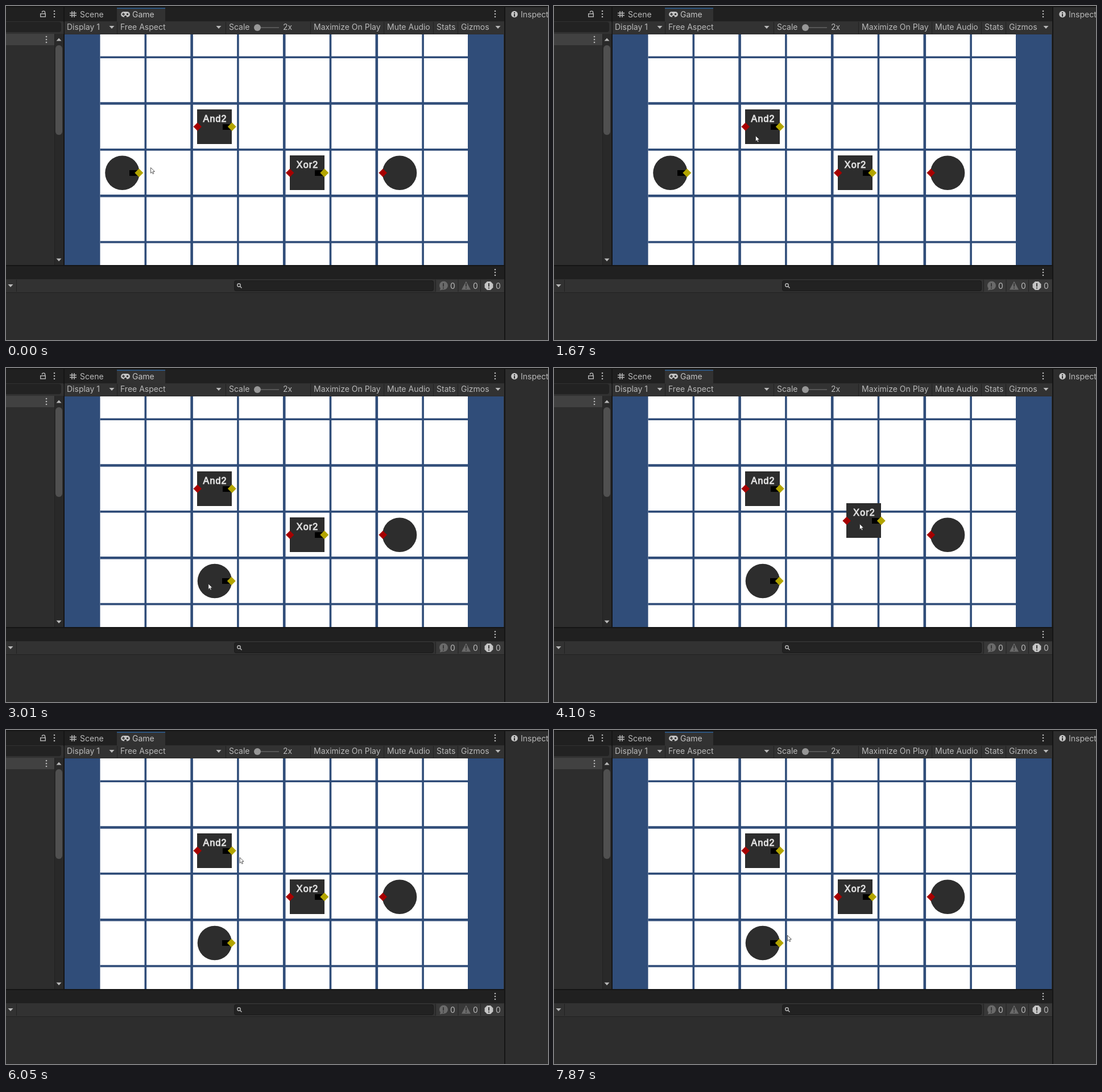
An HTML page with a canvas that plays this animation: 953 px wide and 588 px high, repeating every 7.99 s.

```html
<!DOCTYPE html>
<html lang="en">
<head>
<meta charset="utf-8">
<title>Logic gate editor</title>
<style>
html, body { margin: 0; width: 100%; height: 100%; overflow: hidden; background: #2d2d2d; }
canvas { display: block; }
</style>
</head>
<body>
<canvas id="stage" width="953" height="588"></canvas>
<script>
const ctx = document.getElementById('stage').getContext('2d');
const LOOP = 7990, STEP = 120;
const DARK = '#151515', BAR = '#202020', TOOL = '#323232', PANEL = '#2d2d2d';
const INK = '#b9b9b9', BRIGHT = '#c4c4c4', FIELD = '#222', BLUE = '#304d79';

// The picture updates in even steps, counted anew after each pause.
const RESTARTS = [0, 590, 3260, 5810, 6910];

// Turning points of the pointer: time, x, y
const PATH = [
  [0, 254, 284], [310, 230, 294], [590, 226, 294], [1310, 331, 267], [1670, 354, 228],
  [2150, 195, 299], [2390, 264, 351], [2870, 356, 380], [3260, 354, 378], [3860, 521, 298],
  [4100, 537, 274], [4460, 522, 217.5], [4820, 525, 250], [4940, 527, 292], [5540, 403, 240],
  [5930, 388, 206], [6290, 456, 260], [6530, 445, 344], [6770, 412, 374], [7150, 388, 330],
  [7630, 441, 274], [7870, 410, 361]
];
const SOURCE_DRAG = { from: 2270, to: 2870, glowEnd: 2990 };
const XOR_DRAG = { from: 3980, to: 4940 };

function quantize(t) {
  const start = RESTARTS.findLast(s => s <= t);
  return start + Math.floor((t - start) / STEP) * STEP;
}

function pointerAt(t) {
  const i = Math.max(1, PATH.findIndex(key => key[0] >= t));
  const [t0, x0, y0] = PATH[i - 1], [t1, x1, y1] = PATH[i];
  const u = (t - t0) / (t1 - t0);
  return [x0 + (x1 - x0) * u, y0 + (y1 - y0) * u];
}

const during = (t, { from, to }) => t >= from && t < to;
const cell = (col, row) => ({ x: 204.5 + 81.25 * col, y: 50 + 81.25 * row });

function rect(x, y, w, h, color, radius = 0) {
  ctx.fillStyle = color;
  ctx.beginPath();
  ctx.roundRect(x, y, w, h, radius);
  ctx.fill();
}

function circle(x, y, r, color) {
  rect(x - r, y - r, 2 * r, 2 * r, color, r);
}

function poly(points, color) {
  ctx.fillStyle = color;
  ctx.beginPath();
  points.forEach(([x, y]) => ctx.lineTo(x, y));
  ctx.closePath();
  ctx.fill();
}

function regular(sides, x, y, r, color, turn = 0) {
  poly(Array.from({ length: sides }, (_, i) => {
    const a = (i + turn) * 2 * Math.PI / sides;
    return [x + r * Math.cos(a), y + r * Math.sin(a)];
  }), color);
}

function line(x1, y1, x2, y2, color = INK, width = 1.5) {
  ctx.strokeStyle = color;
  ctx.lineWidth = width;
  ctx.beginPath();
  ctx.moveTo(x1, y1);
  ctx.lineTo(x2, y2);
  ctx.stroke();
}

function text(str, x, y, color = INK) {
  ctx.font = '14px Inter, sans-serif';
  ctx.textAlign = 'left';
  ctx.fillStyle = color;
  ctx.fillText(str, x, y);
}

const divider = (x, y) => rect(x, y, 1, 21, FIELD);
const diamond = (x, y, r, color) => regular(4, x, y, r, color);
const arrow = (x, y, dir = 1) =>
  poly([[x - 4.5, y - 2.5 * dir], [x + 4.5, y - 2.5 * dir], [x, y + 2.5 * dir]], INK);
const menu = (x, y) => [-5, 0, 5].forEach(d => circle(x, y + d, 1.3, INK));

function exclaim(x, y, color) {
  rect(x - 1, y - 4, 2, 6, color);
  rect(x - 1, y + 3.5, 2, 2, color);
}

function drawHierarchy() {
  rect(0, 2, 101, 25, BAR);
  rect(0, 27, 101, 22, TOOL);
  rect(-10, 28, 107, 18, FIELD, 4);
  rect(0, 49, 86, 20, '#414141');
  rect(86, 49, 15, 407, '#292929');
  rect(85, 49, 1, 407, FIELD);
  rect(87, 69, 12, 158, '#505050', 6);
  arrow(93, 59, -1);
  arrow(93, 447);
  menu(85, 14);
  menu(71, 59);
  ctx.strokeStyle = INK;
  ctx.lineWidth = 1.4;
  ctx.strokeRect(60.7, 13.7, 8.6, 5.2);
  ctx.beginPath();
  ctx.arc(66, 11.5, 2.6, Math.PI, 0);
  ctx.lineTo(68.6, 13.5);
  ctx.stroke();
}

function drawGameBar() {
  rect(103, 2, 773, 25, BAR);
  rect(195, 3, 85, 24, TOOL);
  rect(195, 3, 85, 2, '#2c537d');
  rect(103, 27, 773, 22, TOOL);
  for (const d of [-2, 2]) {
    line(118 + d, 9, 118 + d, 20);
    line(112, 14.5 + d, 124, 14.5 + d);
  }
  rect(202, 10, 16, 9.5, BRIGHT, 4.7);
  rect(208, 17, 4, 3, TOOL, 1);
  line(204, 14.5, 209, 14.5, TOOL);
  line(206.5, 12, 206.5, 17, TOOL);
  circle(213.5, 14.5, 1.7, TOOL);
  text('Scene', 130, 20);
  text('Game', 222, 20, BRIGHT);
  menu(860, 14);

  const items = { 'Display 1': 107, 'Free Aspect': 201, 'Scale': 392, 'Maximize On Play': 541,
    'Mute Audio': 670, 'Stats': 757, 'Gizmos': 800 };
  for (const [label, x] of Object.entries(items)) {
    divider(x - 6, 28);
    text(label, x, 42);
  }
  text('2x', 487, 42);
  [186, 374, 865].forEach(x => arrow(x, 37.5));
  rect(442, 37, 38, 2, '#565656');
  circle(442, 38, 6, '#979797');
}

function drawConsole() {
  rect(0, 458, 876, 23, BAR);
  rect(0, 481, 876, 23, TOOL);
  rect(0, 504, 876, 1, FIELD);
  arrow(8, 492.5);
  divider(18, 482);
  menu(860, 469);
  rect(401, 483, 351, 19, '#1b1b1b', 4);
  rect(402, 484, 349, 17, FIELD, 3);
  ctx.strokeStyle = INK;
  ctx.lineWidth = 1.4;
  ctx.beginPath();
  ctx.arc(409.5, 491.5, 2.7, 0, Math.PI * 2);
  ctx.stroke();
  line(411.5, 493.5, 414.5, 496.5);

  const dim = '#6a6a6a', button = '#383838';
  rect(755, 482, 120, 22, button);
  circle(769.5, 492, 7.5, dim);
  poly([[764, 496], [763, 500.5], [769, 499]], dim);
  poly([[809, 484.5], [817, 499.5], [801, 499.5]], dim);
  regular(8, 849, 492.5, 8, BRIGHT, 0.5);
  for (let i = 0; i < 3; i++) {
    divider(755 + 39.5 * i, 482);
    exclaim(769 + 40 * i, 492, button);
    text('0', 781 + 40 * i, 497.5);
  }
}

function drawInspector() {
  circle(894, 14.5, 5.8, BRIGHT);
  rect(893, 11, 2, 2, PANEL);
  rect(893, 14, 2, 4.5, PANEL);
  text('Inspector', 905, 20);
}

function drawGrid() {
  rect(103, 50, 772, 406, BLUE);
  rect(165.5, 50, 646.5, 406, '#fff');
  for (let i = 0; i < 7; i++) {
    const width = i % 2 ? 4.6 : 3.6;
    rect(245.3 + 81.3 * i - width / 2, 50, width, 406, BLUE);
    if (i < 5) rect(165.5, 90.2 + 81.35 * i - width / 2, 646.5, width, BLUE);
  }
}

function drawLabel(label, x, y) {
  ctx.font = '16px "Liberation Sans", Arial, sans-serif';
  ctx.textAlign = 'center';
  ctx.letterSpacing = '1.2px';
  ctx.fillStyle = ctx.strokeStyle = '#e0e0e0';
  ctx.lineWidth = 0.9;
  ctx.fillText(label, x + 0.6, y);
  ctx.strokeText(label, x + 0.6, y);
  ctx.letterSpacing = '0px';
}

function drawNode({ x, y, label, input, output, color = PANEL }) {
  const reach = label ? 30.3 : 29.3;
  if (label) {
    rect(Math.floor(x - 30.5), Math.floor(y - 30.5), 61, 61, color);
    drawLabel(label, x, y - 9);
  } else circle(x, y, 30.3, color);
  if (input) diamond(x - reach, y, 7.3, '#a60000');
  if (output) {
    rect(Math.floor(x + reach - 16), Math.round(y - 5), 16, 10, '#000');
    diamond(x + reach, y, 7.5, '#b3a500');
  }
}

function drawPointer(x, y) {
  const shape = [[0, 0], [0, 9.8], [2.2, 7.7], [3.7, 11.2], [5.3, 10.4], [3.9, 7.1], [6.9, 6.9]];
  poly(shape.map(([dx, dy]) => [x + 0.5 + dx, y + 0.5 + dy]), '#fff');
  ctx.strokeStyle = '#333';
  ctx.lineWidth = 0.8;
  ctx.stroke();
}

function render(t) {
  const [px, py] = pointerAt(t);
  const source = { ...cell(t < SOURCE_DRAG.to ? 0 : 2, t < SOURCE_DRAG.to ? 3 : 4), output: true };
  const xor = { ...cell(4, 3), label: 'Xor2', input: true, output: true };
  if (during(t, SOURCE_DRAG)) Object.assign(source, { x: px + 3.5, y: py - 10.5 });
  if (t >= SOURCE_DRAG.from && t < SOURCE_DRAG.glowEnd) source.color = '#ff0';
  if (during(t, XOR_DRAG)) Object.assign(xor, { x: px + 8, y: py - 5 });

  rect(0, 0, 953, 588, PANEL);
  rect(0, 0, 953, 2, DARK);
  rect(101, 0, 2, 457, DARK);
  rect(0, 456, 877, 2, DARK);
  drawHierarchy();
  drawGameBar();
  drawConsole();
  drawInspector();
  rect(876, 0, 2, 588, DARK);
  drawGrid();
  drawNode({ ...cell(2, 2), label: 'And2', input: true, output: true });
  drawNode({ ...cell(6, 3), input: true });
  drawNode(xor);
  drawNode(source);
  drawPointer(px, py);
}

const begin = performance.now();
function tick() {
  render(quantize((performance.now() - begin) % LOOP));
  requestAnimationFrame(tick);
}
tick();
</script>
</body>
</html>
```
